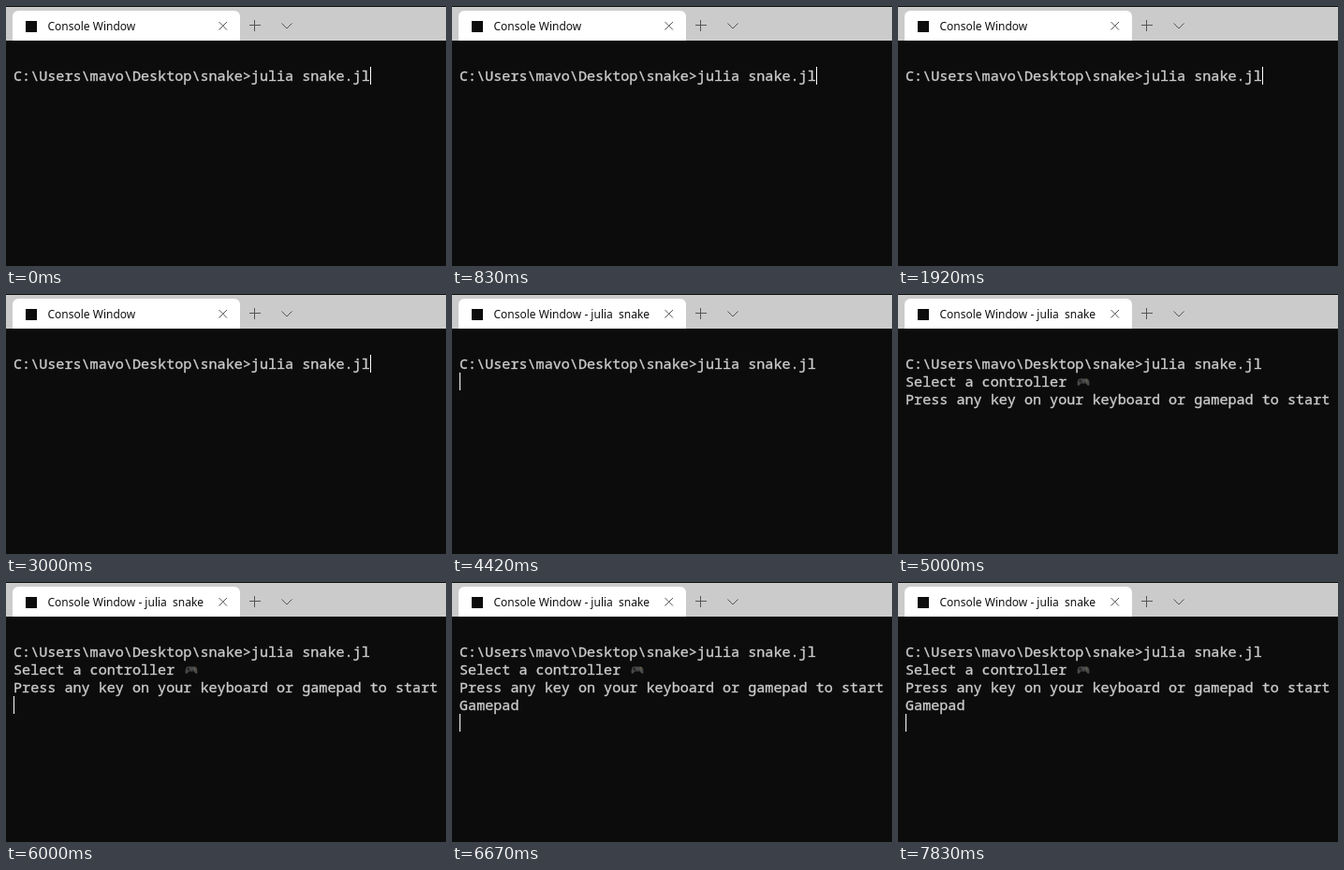
Recreate the animation shown at these times as an HTML page. Size 470 by 278 pixels, loop 8000 ms.

```html
<!DOCTYPE html>
<html lang="en">
<head>
<meta charset="utf-8">
<title>Terminal session</title>
<style>
  html, body { margin: 0; width: 100%; height: 100%; overflow: hidden; background: #0c0c0c; }
  .stage { position: relative; width: 470px; height: 278px; overflow: hidden; background: #0c0c0c; }
  .chrome { position: absolute; left: 0; top: 0; }
  .title {
    position: absolute; left: 44.5px; top: 13px;
    font: 12px/18px "Noto Sans", "Open Sans", sans-serif;
    color: #111; white-space: pre;
  }
  .line {
    position: absolute; left: 8px;
    font: 15.11px/20px "Noto Sans Mono", "DejaVu Sans Mono", monospace;
    color: #ccc; -webkit-text-stroke: .35px #ccc; white-space: pre;
  }
  .l1 { top: 64px; }
  .l2 { top: 83px; }
  .l3 { top: 102px; }
  .l4 { top: 121px; }
  .pad { position: absolute; left: 190px; top: 88px; }
  .cursor { position: absolute; left: 0; top: 0; width: 1px; height: 19px; background: #fff; }

  .running, .prompt, .choice, .cursor { animation: 8s step-end infinite; }
  .running { animation-name: run; }
  .prompt { animation-name: ask; }
  .choice { animation-name: choose; }
  .cursor { animation-name: move, blink; }

  @keyframes run    { 0% { opacity: 0 } 41.625%, 100% { opacity: 1 } }
  @keyframes ask    { 0% { opacity: 0 } 56.25%, 100% { opacity: 1 } }
  @keyframes choose { 0% { opacity: 0 } 83.375%, 100% { opacity: 1 } }
  @keyframes move {
    0%            { transform: translate(389px, 65px) }
    41.625%       { transform: translate(8px, 84px) }
    56.25%        { transform: translate(8px, 122px) }
    83.375%, 100% { transform: translate(8px, 141px) }
  }
  @keyframes blink {
    0%, 10.375%, 24%, 37.5%, 55.25%, 68.75%, 81.25%, 96.875%, 100% { opacity: 1 }
    3.125%, 16.625%, 31.25%, 49%, 62.5%, 76%, 90.625% { opacity: 0 }
  }
</style>
</head>
<body>
<div class="stage">
  <svg class="chrome" width="470" height="37" viewBox="0 0 470 37" fill="none" stroke="#555">
    <path d="M0 1H470V37H0Z" fill="#cbcbcb" stroke="none"/>
    <path d="M7 37V12Q7 5 14 5H243Q250 5 250 12V37Z" fill="#fff" stroke="none"/>
    <path d="M21 16H33V28H21Z" fill="#0c0c0c" stroke="none"/>
    <path d="M227.5 17L236 25.5M236 17L227.5 25.5"/>
    <path d="M260 20.5H272M265.5 15V27"/>
    <path d="M294.5 18.5L300 24L305.5 18.5"/>
  </svg>
  <div class="title">Console Window<span class="running"> - julia  snake</span></div>

  <div class="line l1">C:\Users\mavo\Desktop\snake>julia snake.jl</div>
  <div class="prompt">
    <div class="line l2">Select a controller</div>
    <svg class="pad" width="16" height="12" viewBox="0 0 16 12">
      <path d="M4 2.5H12Q13.6 2.5 14.2 5.5Q15 10 13.4 10Q12.4 10 10.8 7.8H5.2Q3.6 10 2.6 10Q1 10 1.8 5.5Q2.4 2.5 4 2.5Z" fill="#484848"/>
      <path d="M3.2 5H6.2M4.7 3.5V6.5" stroke="#1a1a1a"/>
      <circle cx="6.4" cy="7.2" r="1" fill="#222"/>
      <circle cx="9.6" cy="7.2" r="1" fill="#222"/>
      <circle cx="11.4" cy="3.8" r=".6" fill="#8a7a40"/>
      <circle cx="12.6" cy="5" r=".6" fill="#8a4444"/>
      <circle cx="10.2" cy="5" r=".6" fill="#445f8a"/>
      <circle cx="11.4" cy="6.2" r=".6" fill="#4a7a4a"/>
    </svg>
    <div class="line l3">Press any key on your keyboard or gamepad to start</div>
  </div>
  <div class="line l4 choice">Gamepad</div>
  <div class="cursor"></div>
</div>
</body>
</html>
```
